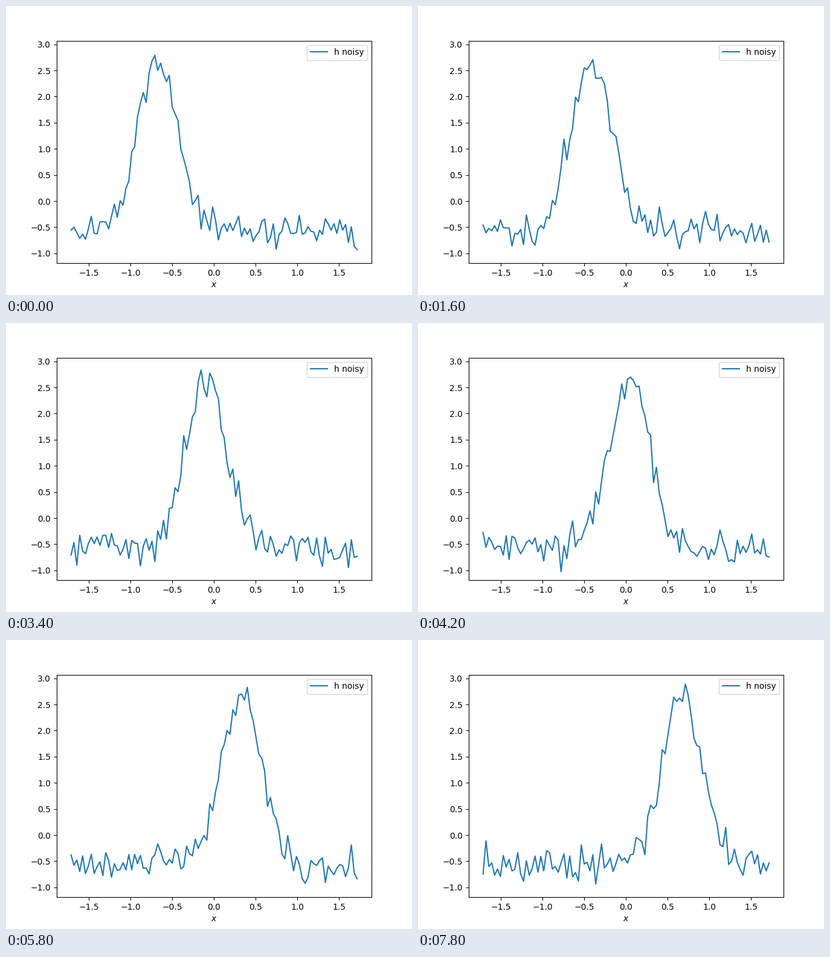
Write a matplotlib script that moves like this. It is 672 px wide and 480 px high and loops after 8000 ms.

```python
import numpy as np
import matplotlib.pyplot as plt
from matplotlib.animation import FuncAnimation

N_FRAMES = 40
N_POINTS = 100
STEP_MS = 200
CENTER = 0.3      # bump position at the start, on the unit interval
NOISE = 0.055

t = np.linspace(0, 1, N_POINTS)
x = (t - t.mean()) / t.std()
noise = np.random.default_rng(7).normal(0, NOISE, (N_FRAMES, N_POINTS))


def signal(i):
    """Noisy Gaussian, one sample further right per frame, standardised."""
    center = CENTER + i / (N_POINTS - 1)
    h = np.exp(-((t - center) / 0.1) ** 2) + noise[i]
    return (h - h.mean()) / h.std()


fig, ax = plt.subplots(figsize=(6.72, 4.8), dpi=100)
line, = ax.plot(x, signal(0), label="h noisy")
ax.set_xlim(1.1 * x[0], 1.1 * x[-1])
ax.set_ylim(-1.1886, 3.0696)
ax.set_xlabel("$x$")
ax.legend(loc="upper right")


def update(i):
    line.set_ydata(signal(i))
    return line,


anim = FuncAnimation(fig, update, frames=N_FRAMES, interval=STEP_MS,
                     repeat=True, repeat_delay=0)
plt.show()
```
